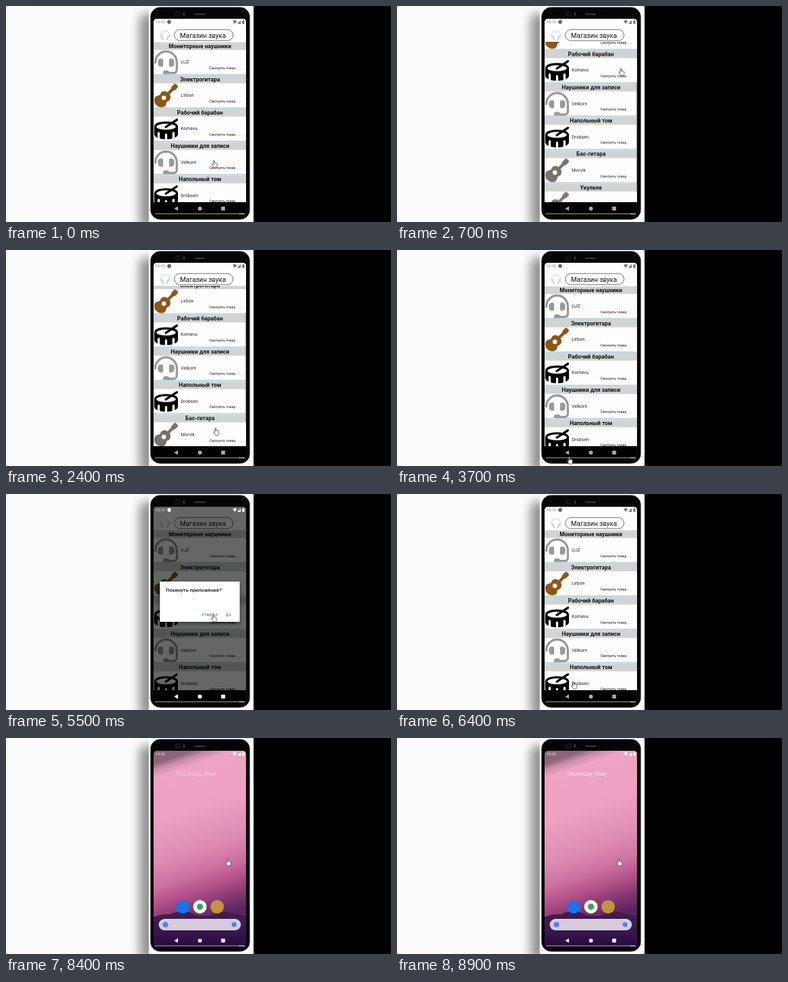
An HTML page for the animation above (9 s loop, 600 px wide and 338 px high).

```html
<!DOCTYPE html>
<html lang="ru">
<head>
<meta charset="utf-8">
<title>Магазин звука</title>
<style>
  html, body { margin: 0; width: 100%; height: 100%; overflow: hidden; background: #fff; }
  svg { display: block; width: 100vw; height: 100vh; }
  text { font-family: Roboto, sans-serif; white-space: pre; }
  .title { font-size: 8.8px; font-weight: 700; text-anchor: middle; fill: #111; }
  .brand { font-size: 7.2px; fill: #222; }
  .link { font-size: 5.4px; fill: #111; }
  .shop { font-size: 10.3px; text-anchor: middle; fill: #111; }
  .clock { font-size: 6px; }
  .ask { font-size: 7.8px; font-weight: 500; fill: #1a1a1a; }
  .button { font-size: 5.6px; font-weight: 500; letter-spacing: .45px; fill: #2a7fb0; }
  .date { font-size: 9.9px; fill: #fff; }
</style>
</head>
<body>
<svg id="stage" viewBox="0 0 600 338" preserveAspectRatio="none"></svg>
<script>
const LOOP = 9000, TICK = 100;
const PITCH = 52.15, LIST_TOP = 56.8, LIST_HEIGHT = 250.2;
const WIDTH = 144.2;

// Row icons are drawn in a box of 512 units.
const cup = "M192 208a32 32 0 0 0-32-32h-16a64 64 0 0 0-64 64v48a64 64 0 0 0 64 64h16a32 32 0 0 0 32-32z";
const headset = c => `
  <path d="M24 264v-8a232 232 0 0 1 464 0V422a66 66 0 0 1-66 66H256" fill="none" stroke="${c}" stroke-width="48"/>
  <circle cx="24" cy="264" r="24" fill="${c}"/>
  <rect x="192" y="432" width="128" height="96" rx="48" fill="${c}"/>
  <path d="${cup}" fill="${c}"/>
  <path d="${cup}" fill="${c}" transform="matrix(-1 0 0 1 512 0)"/>`;

const guitar = c => `
  <path d="M503 39 473 9a32 32 0 0 0-45 0L381 56a35 35 0 0 0-8 13L361 106 285 182
    Q265 168 244 163C211 155 177 162 154 185Q140 200 134 219C128 237 111 251 92 253Q55 257 30 281
    C-16 327-8 409 48 464S185 528 231 483Q255 459 259 420C261 401 275 384 293 378Q312 372 327 357
    C350 335 357 301 349 268Q344 246 330 227L406 151 442 139a35 35 0 0 0 14-8L503 84a32 32 0 0 0 0-45z" fill="${c}"/>
  <circle cx="208" cy="304" r="48" fill="#fff"/>`;

const drum = c => `
  <path d="M0 208C0 100 220 96 256 96S512 100 512 208V368C512 430 400 480 256 480S0 430 0 368z" fill="${c}"/>
  <ellipse cx="256" cy="208" rx="208" ry="64" fill="#fff"/>
  <g fill="none" stroke-linecap="round" stroke-width="48">
    <path d="M250 214 490 56" stroke="${c}"/>
    <path d="M96 345v140M256 377v120M416 345v140" stroke="#fff"/>
  </g>`;

const goods = [
  ["Мониторные наушники", "UJZ", headset, "#999"],
  ["Электрогитара", "Lirbon", guitar, "#8f5616"],
  ["Рабочий барабан", "Komavu", drum, "#000"],
  ["Наушники для записи", "Velkorn", headset, "#999"],
  ["Напольный том", "Drobsen", drum, "#000"],
  ["Бас-гитара", "Morvik", guitar, "#7a716c"],
  ["Укулеле", "Komavu", guitar, "#8c766c"]
];
const CONTENT = goods.length * PITCH;
const RATIO = LIST_HEIGHT / CONTENT;
const MAX = CONTENT - LIST_HEIGHT;

const row = ([title, brand, icon, color], i) => `
  <g transform="translate(230 ${LIST_TOP + i * PITCH})">
    <rect width="${WIDTH}" height="${PITCH}" fill="#fefefe"/>
    <rect width="${WIDTH}" height="12" fill="#d3d3d3"/>
    <g transform="translate(1 12.8) scale(.0722)">${icon(color)}</g>
    <rect y="49.7" width="${WIDTH}" height="2.45" fill="#b4d9e8"/>
    <text class="title" x="72.3" y="8.9">${title}</text>
    <text class="brand" x="42.3" y="33.4">${brand}</text>
    <text class="link" x="87" y="42">Смотреть товар</text>
    <path d="M128 41.6h8.500" stroke="#9bb4c0" stroke-width=".8" stroke-dasharray="1 1.100"/>
  </g>`;

const statusBar = c => `
  <g fill="${c}">
    <text class="clock" x="232.8" y="27.2">10:10</text>
    <path d="M353.200 23.600q3.300-2.600 6.600 0L356.500 28z"/>
    <path d="M365.800 22.300V28h-5.400z"/>
    <path d="M368.200 23h.9v-.8h1.600v.8h.9v5h-3.400z"/>
  </g>`;

const navBar = c => `
  <g fill="${c}">
    <path d="M262 317l6-3.500v7z"/>
    <circle cx="302.2" cy="317" r="3.1"/>
    <rect x="335.4" y="314" width="6" height="6"/>
  </g>`;

const disc = (x, y, r, c) => `<circle cx="${x}" cy="${y}" r="${r}" fill="${c}"/>`;
const badge = c => disc(254.3, 25, 2.9, c);

const home = `
  <rect x="230" y="20" width="${WIDTH}" height="307" fill="url(#sky)"/>
  <path d="M230 280q14-5 26-4 10-6 19-3 9-3 20 4 16 3 30-1 14-6 24-3 12 3 25.500 6V327H230z" fill="url(#hills)"/>
  <text id="date" class="date" x="264" y="58.6">Thursday, May</text>
  ${disc(275.5, 264, 10.5, "#1a73e8")}
  ${disc(302.2, 264, 10.5, "#fff")}${disc(302.2, 264, 4.8, "#34a853")}
  ${disc(329, 264, 10.5, "#c3933f")}
  <rect x="238" y="283" width="128" height="18" rx="9" fill="#d9cbdb"/>
  ${disc(248.5, 292, 4.3, "#4285f4")}
  ${disc(355.5, 292, 3.8, "#4285f4")}`;

const app = `
  <rect x="230" y="20" width="${WIDTH}" height="307" fill="#fefefe"/>
  <g clip-path="url(#list)">
    <g id="rows">${goods.map(row).join("")}</g>
    <rect id="thumb" x="372.4" y="${LIST_TOP}" width="1.7" height="${LIST_HEIGHT * RATIO}" fill="#999"/>
  </g>
  <g fill="none" stroke="#a5d3ea" stroke-width="1">
    <path d="M241.400 50a7.400 7.400 0 1 1 12.800 0"/>
    <path d="M242.600 46.500l2.200 6.300M253 46.500l-2.200 6.300" stroke-width="1.900" stroke-linecap="round"/>
  </g>
  <rect x="262.3" y="36.9" width="91.5" height="17.2" rx="8.6" fill="#fff" stroke="#444" stroke-width=".8"/>
  <text class="shop" x="307" y="49.5">Магазин звука</text>
  ${statusBar("#777")}${badge("#666")}
  <rect x="230" y="307" width="${WIDTH}" height="20" fill="#000"/>
  ${navBar("#aaa")}
  <g id="dialog">
    <rect x="230" y="20" width="${WIDTH}" height="287" fill="#000" opacity=".6"/>
    <rect x="239" y="139" width="126" height="64" rx="2" fill="#000" opacity=".45" filter="url(#soft)"/>
    <rect x="239.8" y="137" width="124.5" height="63" rx="1" fill="#fff"/>
    <text class="ask" x="249.3" y="152.6">Покинуть приложение?</text>
    <text class="button" x="304.8" y="191">ОТМЕНА</text>
    <text class="button" x="342.6" y="191">ДА</text>
    ${badge("#fff")}
  </g>`;

const stops = list => list.map(([at, c]) => `<stop offset="${at}" stop-color="${c}"/>`).join("");

document.getElementById("stage").innerHTML = `
  <defs>
    <clipPath id="list"><rect x="230" y="${LIST_TOP}" width="${WIDTH}" height="${LIST_HEIGHT}"/></clipPath>
    <clipPath id="screen"><rect x="230" y="20" width="${WIDTH}" height="307" rx="5"/></clipPath>
    <filter id="blur" x="-40%" y="-20%" width="180%" height="140%"><feGaussianBlur stdDeviation="8"/></filter>
    <filter id="soft" x="-20%" y="-20%" width="140%" height="140%"><feGaussianBlur stdDeviation="3"/></filter>
    <linearGradient id="sky" x1=".42" x2=".58" y2="1">${stops([
      [0, "#8d6478"], [.03, "#c98aa8"], [.07, "#eea3c3"], [.3, "#eda0c1"], [.5, "#dd8bb2"],
      [.62, "#cc70a0"], [.7, "#b4528a"], [.79, "#85386f"], [.87, "#572560"]])}</linearGradient>
    <linearGradient id="hills" x2="0" y2="1">${stops([[0, "#411d50"], [.5, "#3a1852"], [1, "#260b3b"]])}</linearGradient>
  </defs>
  <rect width="600" height="338" fill="#fbfbfb"/>
  <rect x="208" y="12" width="170" height="336" rx="10" opacity=".42" filter="url(#blur)"/>
  <rect x="222.5" width="164" height="338" fill="#fafafa"/>
  <rect x="385.8" width="215" height="338"/>
  <rect x="225.3" y="2" width="154.5" height="332" rx="15" fill="#050505" stroke="#333" stroke-width=".7"/>
  <circle cx="267.3" cy="12.6" r="3.3" fill="none" stroke="#2b2b2b"/>
  <rect x="275.5" y="9.8" width="3.5" height="5.6" rx="1" fill="#2b2b2b"/>
  <rect x="294" y="12" width="16.5" height="1.4" rx=".7" fill="#4a4a4a"/>
  <g clip-path="url(#screen)">
    ${home}
    <g id="app">${app}</g>
    <g id="bright">${statusBar("#fff")}${navBar("#fff")}</g>
  </g>
  <path d="M232 325.300h131" stroke="#777" stroke-width="1.400"/>
  <path d="M363 325.300h9" stroke="#ccc" stroke-width="1.400"/>
  <g id="pointer">
    <path d="M2.900 7V1.300q0-1 .9-1t.9 1V5q.2-.7 1-.6t.9.800q.2-.5.9-.4t.8.900q.9-.4 1.100.7V9q0 2-1.300 3.500H4Q2.500 10.500.700 8.200.200 7.200 1 6.800t1.900 1z"
      transform="translate(.3 .2) scale(.94)" fill="#fff" stroke="#222" stroke-width=".8" stroke-linejoin="round"/>
  </g>`;

// Steps are [ms, ...values]; values advance once per tick.
function track(id, steps, style) {
  const all = [...steps];
  if (all[0][0] > 0) all.unshift([0, ...all[0].slice(1)]);
  const last = all[all.length - 1];
  if (last[0] < LOOP) all.push([LOOP, ...last.slice(1)]);
  const frames = all.map(([ms, ...v], i) => {
    const ticks = i + 1 < all.length ? Math.round((all[i + 1][0] - ms) / TICK) : 1;
    return { offset: ms / LOOP, easing: `steps(${Math.max(1, ticks)}, end)`, ...style(...v) };
  });
  document.getElementById(id).animate(frames, { duration: LOOP, iterations: Infinity });
}

const fade = opacity => ({ opacity });
const move = (x, y) => ({ transform: `translate(${x}px, ${y}px)` });

track("rows", [[100, 0], [700, 91.6], [1000, MAX], [2000, MAX], [2400, 59.8], [2900, 0]], s => move(0, -s));
track("thumb", [
  [100, 0, 0], [300, 30, .5], [700, 91.6, .5], [1000, MAX, .5], [1300, MAX, .5], [1600, MAX, 0],
  [2000, MAX, 0], [2100, 100.5, .5], [2400, 59.8, .5], [2900, 0, .5], [3200, 0, .5], [3500, 0, 0]
], (s, opacity) => ({ ...move(0, s * RATIO), opacity }));

const asked = [[4400, 0], [4600, 1], [5800, 1], [6000, 0], [6800, 0], [7000, 1]];
track("dialog", asked, fade);
track("bright", asked, fade);
track("app", [[7800, 1], [8100, 0]], fade);
track("date", [[8100, 0], [8600, .7]], fade);

track("pointer", [
  [0, 320, 241], [100, 320, 241], [700, 345, 97], [1000, 347, 75], [1400, 346, 90], [2000, 331, 210],
  [2400, 322.5, 278], [2700, 320, 298], [3100, 318, 300], [3700, 264.5, 323], [4000, 261.5, 314],
  [5000, 261.5, 314], [5400, 319, 188], [5900, 319, 188], [6500, 261.5, 314], [7000, 261.5, 314],
  [7400, 335, 192], [7900, 335, 192], [8400, 341.5, 188]
], move);
</script>
</body>
</html>
```
